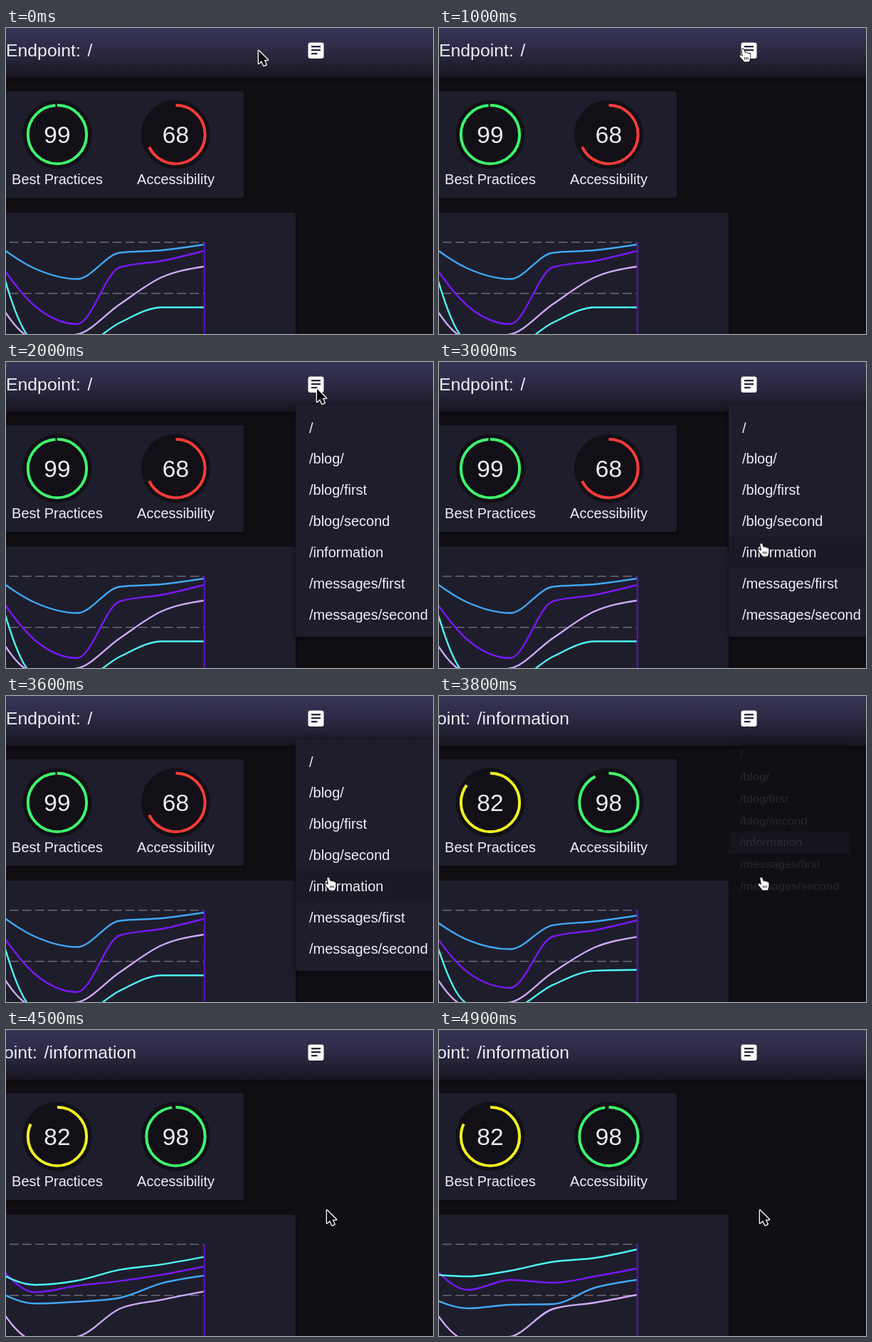
An HTML page with a canvas for the animation above (5 s loop, 600 by 431 pixels).

```html
<!DOCTYPE html>
<html lang="en">
<head>
<meta charset="utf-8">
<title>Endpoint dashboard</title>
<style>
html, body { margin: 0; width: 100%; height: 100%; overflow: hidden; background: #110f14; }
canvas { display: block; width: 600px; height: 431px; }
</style>
</head>
<body>
<canvas id="stage"></canvas>
<script>
const W = 600, H = 431, LOOP = 5000, TICK = 100;
const canvas = document.getElementById('stage');
const ratio = window.devicePixelRatio || 1;
canvas.width = W * ratio;
canvas.height = H * ratio;
const ctx = canvas.getContext('2d');

const BG = '#110f14', CARD = '#1e1d2b', TEXT = '#efecf6';
const GREEN = '#3df56d', RED = '#fb3c39', YELLOW = '#f2f41d';
const FONT = '"Liberation Sans", Arial, Helvetica, sans-serif';

const OPEN = 1350, CLOSE = 3605, SWITCH = 3640, CHART = 3655, GROW = 318;
const ROW = 43.9, MENU_X = 407, MENU_Y = 61, ROWS_Y = 70.5;
const ROUTES = ['/', '/blog/', '/blog/first', '/blog/second',
  '/information', '/messages/first', '/messages/second'];

// Curve heights at the knots, before and after the route change
const KNOTS = [-18, 41, 100, 160, 219, 278];
const SERIES = [
  { color: '#d0abf8', from: [374, 437, 431.5, 389, 351, 336], to: [378, 437, 432, 393, 384, 373] },
  { color: '#7a18fa', from: [318, 392, 417, 337, 328, 314], to: [323, 366, 352, 356, 347, 336] },
  { color: '#40a8f4', from: [301, 339, 353.5, 316.5, 313, 305], to: [374, 392, 387, 386, 363, 352] },
  { color: '#4ef8f4', from: [299, 442, 450, 415, 393.5, 393.5], to: [343.5, 347, 339, 326.5, 321, 309] }
];

// Cursor stops: time, x, y
const PATH = [
  [0, 355, 32], [430, 355, 32], [950, 425, 28], [1500, 425, 28],
  [1850, 437, 38], [2300, 437, 38], [2900, 451, 254], [LOOP, 451, 254]
];

const clamp = v => Math.max(0, Math.min(1, v));
const mix = (a, b, p) => a + (b - a) * p;

function bezier(x1, y1, x2, y2) {
  const at = (a, b, u) => 3 * a * u * (1 - u) ** 2 + 3 * b * u * u * (1 - u) + u ** 3;
  return x => {
    x = clamp(x);
    let lo = 0, hi = 1;
    for (let i = 0; i < 24; i++) {
      const mid = (lo + hi) / 2;
      if (at(x1, x2, mid) < x) lo = mid; else hi = mid;
    }
    return at(y1, y2, (lo + hi) / 2);
  };
}
const standard = bezier(0.4, 0, 0.2, 1);
const ease = bezier(0.25, 0.1, 0.25, 1);

function box(x, y, w, h, r, fill) {
  ctx.beginPath();
  ctx.roundRect(x, y, w, h, r);
  ctx.fillStyle = fill;
  ctx.fill();
}

function shaded(blur, draw) {
  ctx.save();
  ctx.shadowColor = 'rgba(0,0,0,0.55)';
  ctx.shadowBlur = blur * ratio;
  ctx.shadowOffsetY = 2 * ratio;
  draw();
  ctx.restore();
}

function label(text, x, y, size, align = 'left') {
  ctx.font = `${size}px ${FONT}`;
  ctx.textAlign = align;
  ctx.fillStyle = TEXT;
  ctx.fillText(text, x, y);
}

function drawHeader(t) {
  const g = ctx.createLinearGradient(0, 0, 0, 70);
  g.addColorStop(0, '#383557');
  g.addColorStop(0.5, '#2a2841');
  g.addColorStop(1, '#181620');
  shaded(10, () => box(-20, -20, W + 40, 90, 0, g));
  const changed = t >= SWITCH;
  label('Endpoint:', changed ? -61 : 0, 40, 24.8);
  label(changed ? '/information' : '/', changed ? 53.5 : 114.5, 40, 24.8);

  box(424.5, 20.5, 22, 22.5, 3, '#fff');
  [13, 13, 8.5].forEach((w, i) => box(429, 25 + i * 5, w, 2.3, 0, '#272540'));
}

function drawGauge(x, name, value, arc, color) {
  ctx.beginPath();
  ctx.arc(x, 150, 48.5, 0, Math.PI * 2);
  ctx.fillStyle = '#121016';
  ctx.fill();
  ctx.beginPath();
  ctx.arc(x, 150, 41.2, -Math.PI / 2, Math.PI * (arc / 50 - 0.5));
  ctx.strokeStyle = color;
  ctx.lineWidth = 4;
  ctx.stroke();
  label(value, x, 161.5, 33.5, 'center');
  label(name, x, 220, 20, 'center');
}

function drawGauges(t) {
  shaded(5, () => box(-20, 89, 354, 150.5, 4, CARD));
  const p = standard((t - SWITCH) / 300), changed = t >= SWITCH;
  drawGauge(72, 'Best Practices', changed ? 82 : 99, mix(99, 82, p), changed ? YELLOW : GREEN);
  drawGauge(238.5, 'Accessibility', changed ? 98 : 68, mix(68, 98, p), changed ? GREEN : RED);
}

// Monotone cubic through the knots
function drawCurve(ys, color) {
  const n = ys.length, s = [], m = [];
  for (let i = 0; i < n - 1; i++) s[i] = (ys[i + 1] - ys[i]) / (KNOTS[i + 1] - KNOTS[i]);
  for (let i = 1; i < n - 1; i++) {
    const a = s[i - 1], b = s[i];
    m[i] = (Math.sign(a) + Math.sign(b)) * Math.min(Math.abs(a), Math.abs(b), Math.abs(a + b) / 4);
  }
  m[0] = (3 * s[0] - m[1]) / 2;
  m[n - 1] = (3 * s[n - 2] - m[n - 2]) / 2;
  ctx.beginPath();
  ctx.moveTo(KNOTS[0], ys[0]);
  for (let i = 0; i < n - 1; i++) {
    const d = (KNOTS[i + 1] - KNOTS[i]) / 3;
    ctx.bezierCurveTo(KNOTS[i] + d, ys[i] + d * m[i],
      KNOTS[i + 1] - d, ys[i + 1] - d * m[i + 1], KNOTS[i + 1], ys[i + 1]);
  }
  ctx.strokeStyle = color;
  ctx.lineWidth = 2.4;
  ctx.stroke();
}

function drawChart(t) {
  shaded(5, () => box(-20, 260, 427, 200, 4, CARD));
  ctx.strokeStyle = '#6c6a78';
  ctx.lineWidth = 1.4;
  ctx.setLineDash([12.6, 5.5]);
  for (const y of [301.8, 373.8]) {
    ctx.beginPath();
    ctx.moveTo(5, y);
    ctx.lineTo(278, y);
    ctx.stroke();
  }
  ctx.setLineDash([]);
  const p = ease((t - CHART) / 1500) / ease((LOOP - TICK - CHART) / 1500);
  for (const { color, from, to } of SERIES) {
    drawCurve(from.map((y, i) => mix(y, to[i], p)), color);
  }
  box(277.7, 302, 2.2, 140, 0, '#5c13b8');
}

function drawMenu(t, pointer) {
  if (t < OPEN || t >= CLOSE + GROW) return;
  const closing = t >= CLOSE;
  const alpha = closing ? 1 - standard((t - CLOSE) / GROW) : standard((t - OPEN) / GROW);
  const grown = closing
    ? 1 - standard((t - CLOSE - GROW / 3) / (GROW * 2 / 3))
    : standard((t - OPEN) / (GROW * 2 / 3));
  const scale = mix(0.75, 1, grown);
  const hover = closing ? 4 : Math.floor((pointer.y - ROWS_Y) / ROW);

  ctx.save();
  ctx.globalAlpha = alpha;
  ctx.translate(MENU_X, MENU_Y + 1);
  ctx.scale(scale, scale * scale);
  ctx.translate(-MENU_X, -MENU_Y - 1);
  shaded(9, () => box(MENU_X, MENU_Y, 204, 326, 4, CARD));
  if (hover >= 0) {
    box(MENU_X, ROWS_Y + hover * ROW, 204, ROW, 0, closing ? '#45435a' : '#1c1926');
  }
  ROUTES.forEach((route, i) => label(route, 426, 99.5 + i * ROW, 20));
  ctx.restore();
}

function pointerAt(t) {
  const i = PATH.findIndex((s, k) => k && t <= s[0]);
  const [t0, x0, y0] = PATH[i - 1], [t1, x1, y1] = PATH[i];
  const u = (t - t0) / (t1 - t0), p = u * u * (3 - 2 * u);
  return { x: mix(x0, x1, p), y: mix(y0, y1, p) };
}

const ARROW = new Path2D('M0 0V18L4.2 14.2L7.2 21L10.6 19.5L7.7 13H13Z');
const HAND = new Path2D('M.4 3.2C-.1 1.4 2.5.6 3.3 2.4L5.2 7.4C5.9 6.2 7.7 6.4 8.1 7.8' +
  'C8.8 6.9 10.2 7.3 10.5 8.5C11.5 8 12.4 8.7 12.4 10V13.5C12.4 16 11.2 17 11 19.6H3.6' +
  'C3 17.4-.2 15-2.2 12.2C-3.2 10.6-1.4 9.6-.2 10.6L2 12.2Z');

function drawPointer(t, { x, y }) {
  const onIcon = t < OPEN && x > 418;
  const onMenu = t >= OPEN && t < CLOSE + GROW && y > ROWS_Y;
  ctx.save();
  ctx.translate(x, y);
  ctx.lineJoin = 'round';
  if (onIcon || onMenu) {
    ctx.strokeStyle = '#0b0a0e';
    ctx.lineWidth = 1.6;
    ctx.stroke(HAND);
    ctx.fillStyle = '#fff';
    ctx.fill(HAND);
    ctx.lineWidth = 0.9;
    ctx.beginPath();
    for (const k of [4.6, 6.9, 9.2]) {
      ctx.moveTo(k, 13);
      ctx.lineTo(k, 16.5);
    }
    ctx.stroke();
  } else {
    ctx.strokeStyle = '#fff';
    ctx.lineWidth = 2.6;
    ctx.stroke(ARROW);
    ctx.fillStyle = '#0b0a0e';
    ctx.fill(ARROW);
  }
  ctx.restore();
}

function render(t) {
  ctx.setTransform(ratio, 0, 0, ratio, 0, 0);
  ctx.fillStyle = BG;
  ctx.fillRect(0, 0, W, H);
  const pointer = pointerAt(t);
  drawGauges(t);
  drawChart(t);
  drawHeader(t);
  drawMenu(t, pointer);
  drawPointer(t, pointer);
}

const start = performance.now();
function loop() {
  const t = (performance.now() - start) % LOOP;
  render(Math.floor(t / TICK) * TICK);
  requestAnimationFrame(loop);
}
loop();
</script>
</body>
</html>
```
